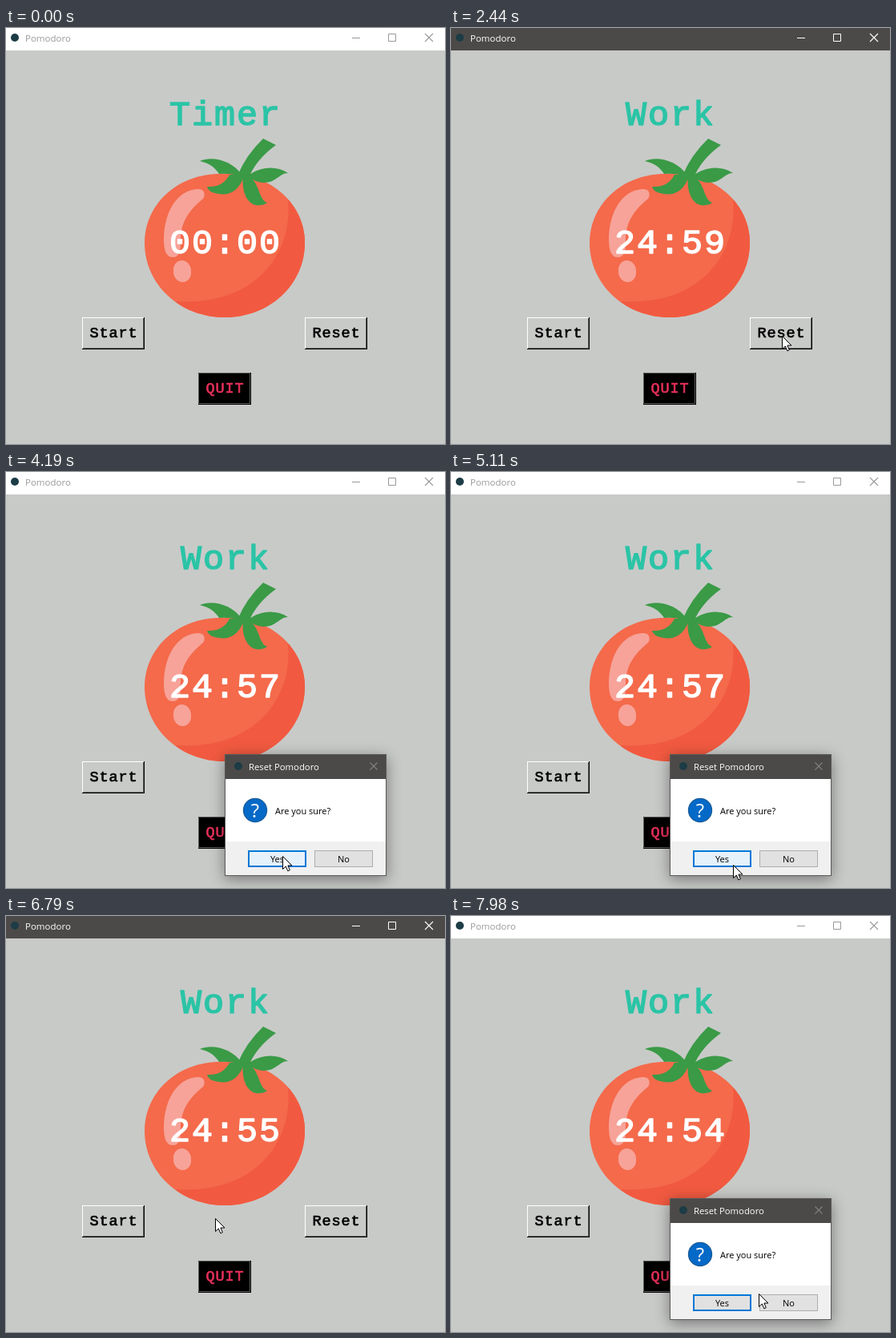
An HTML page with a canvas that plays this animation: 548x519 px, repeating every 8 s.

```html
<!DOCTYPE html>
<html lang="en">
<head>
<meta charset="utf-8">
<title>Pomodoro</title>
<style>
html, body { margin: 0; width: 100%; height: 100%; overflow: hidden; background: #c8cac8; }
canvas { display: block; }
</style>
</head>
<body>
<canvas id="stage" width="548" height="519"></canvas>
<script>
const W = 548, H = 519, LOOP = 8000;
const MONO = '"Liberation Mono", "Courier New", monospace';
const SANS = '"Open Sans", "Noto Sans", sans-serif';
const BG = '#c8cac8', BAR = '#4c4a48', BLUE = '#0078d7';

const screen = document.getElementById('stage').getContext('2d');
const layer = document.createElement('canvas');
layer.width = W;
layer.height = H;
const layerCtx = layer.getContext('2d');
let ctx = screen;

const START_DOWN = 930, START_UP = 1060, TICK = 1020;
const RESET_DOWN = [2740, 7450];
const OPEN = [2855, 7600];
const CLOSE = [5600, Infinity];
const NO_DOWN = 5500;

// Pointer path: time, x, y
const path = [
  [90, 322, 484], [400, 190, 415], [650, 119, 372], [850, 138, 383],
  [1380, 138, 384], [1480, 279, 307], [1640, 385, 345], [1850, 417, 388],
  [2170, 412, 383], [2830, 414, 385], [3010, 414, 385], [3300, 395, 440],
  [3600, 340, 470], [3820, 330, 478], [4190, 345, 479], [4500, 415, 485],
  [4700, 420, 488], [4950, 345, 488], [5200, 360, 491], [5440, 416, 484],
  [5700, 416, 484], [6000, 290, 440], [6290, 190, 401], [6450, 135, 390],
  [6600, 165, 380], [6790, 260, 377], [7080, 424, 380], [7170, 420, 379],
  [7480, 414, 385], [7700, 414, 385], [7980, 384, 471]
];

const clamp = v => Math.max(0, Math.min(1, v));

// Slope at a key; zero where the axis turns or rests
function slope(i, axis) {
  const a = path[i - 1], b = path[i], c = path[i + 1];
  if (!a || !c) return 0;
  const s = (b[axis] - a[axis]) / (b[0] - a[0]);
  const r = (c[axis] - b[axis]) / (c[0] - b[0]);
  return s * r <= 0 ? 0 : 2 * s * r / (s + r);
}

function pointer(t) {
  const last = path[path.length - 1];
  if (t >= last[0]) return [last[1], last[2]];
  const i = Math.max(0, path.findIndex(k => k[0] > t) - 1);
  const a = path[i], b = path[i + 1];
  const d = b[0] - a[0], u = clamp((t - a[0]) / d);
  return [1, 2].map(n => {
    const h = u * u * (3 - 2 * u);
    return a[n] + (b[n] - a[n]) * h
      + d * u * (1 - u) * ((1 - u) * slope(i, n) - u * slope(i + 1, n));
  });
}

function rect(x, y, w, h, color) {
  ctx.fillStyle = color;
  ctx.fillRect(x, y, w, h);
}

function frame(x, y, w, h, color, line = 1) {
  ctx.strokeStyle = color;
  ctx.lineWidth = line;
  ctx.strokeRect(x + line / 2, y + line / 2, w - line, h - line);
}

function text(str, x, y, font, color, align = 'left') {
  ctx.font = font;
  ctx.fillStyle = color;
  ctx.textAlign = align;
  ctx.fillText(str, x, y);
}

// Typewriter lettering: one glyph per cell, slightly thickened
function typed(str, cx, y, pitch, color) {
  const size = pitch * 1.55;
  ctx.strokeStyle = color;
  ctx.lineWidth = size * 0.035;
  ctx.lineJoin = 'round';
  [...str].forEach((ch, i) => {
    const x = cx + (i - (str.length - 1) / 2) * pitch;
    text(ch, x, y, size + 'px ' + MONO, color, 'center');
    ctx.strokeText(ch, x, y);
  });
}

function dot(x, y, r, color) {
  ctx.fillStyle = color;
  ctx.beginPath();
  ctx.arc(x, y, r, 0, 7);
  ctx.fill();
}

function cross(x, y, size, color) {
  ctx.strokeStyle = color;
  ctx.lineWidth = 1.1;
  ctx.beginPath();
  ctx.moveTo(x, y);
  ctx.lineTo(x + size, y + size);
  ctx.moveTo(x + size, y);
  ctx.lineTo(x, y + size);
  ctx.stroke();
}

const body = new Path2D('M273 361C217 361 173 320 173 268C173 220 214 182 267 182' +
  'H279C331 182 373 220 373 268C373 320 329 361 273 361Z');
const shade = new Path2D('M352 215C358 281 312 347 212 341L230 375H390V215Z');
const shine = new Path2D('M238 201C247 200 250 207 246 213C230 226 219 240 218 262' +
  'C218 275 218 286 208 286C199 286 197 275 197 262C198 228 214 203 238 201Z' +
  'M231 303.500A11 12.500 -10 1 1 209 303.500A11 12.500 -10 1 1 231 303.500Z');
const leaves = [
  'M321 138L337 146Q312 164 303 187L289 184Q300 158 321 138Z',
  'M242 166C258 159 283 166 294 183L290 184Q279 181 266 182C260 173 254 169 242 166Z',
  'M251 198C265 199 274 193 279 183L298 183C293 198 284 207 272 207.500C261 207 253 205 251 198Z',
  'M296 184C294 201 299 218 312 221Q320 222 326 218C315 214 318 196 303 184Z',
  'M301 185C317 173 336 171 352 181C341 181 338 193 321 193Q311 192 301 185Z'
].map(d => new Path2D(d));

function tomato() {
  ctx.fillStyle = '#f46a4b';
  ctx.fill(body);
  ctx.save();
  ctx.clip(body);
  ctx.fillStyle = '#f15a40';
  ctx.fill(shade);
  ctx.restore();
  ctx.fillStyle = '#f7a399';
  ctx.fill(shine);
  ctx.fillStyle = '#3a9a46';
  leaves.forEach(p => ctx.fill(p));
}

function titleBar(active) {
  const ink = active ? '#fff' : '#999';
  rect(0, 0, W, 28, active ? BAR : '#fff');
  dot(11, 12, 5, '#1c3c46');
  text('Pomodoro', 24, 17, '11.5px ' + SANS, ink);
  rect(432, 12, 10, 1, ink);
  frame(477, 7, 10, 10, ink);
  cross(523, 7, 10, ink);
}

function button(label, x, y, w, down) {
  const h = 40, o = down ? 1 : 0;
  rect(x, y, w, h, down ? '#fff' : '#000');
  rect(x, y, w - 1, h - 1, down ? '#000' : '#fff');
  rect(x + 1, y + 1, w - 2, h - 2, down ? BG : '#5c5d5c');
  rect(x + 1 + o, y + 1 + o, w - 3 - o, h - 3 - o, BG);
  typed(label, x + w / 2 + o, y + 25 + o, 12, '#000');
}

function quitButton() {
  rect(240, 430, 66, 40, '#000');
  frame(240, 430, 65, 39, '#5c5d5c');
  typed('QUIT', 273, 455, 12, '#e7305b');
}

function choice(label, x, w, { hover, focus, down }) {
  rect(x, 472, w, 21, down ? '#cce4f7' : hover ? '#e5f1fb' : '#e1e1e1');
  const edge = down ? '#005499' : hover || focus ? BLUE : '#adadad';
  frame(x, 472, w, 21, edge, focus && !down ? 2 : 1);
  text(label, x + w / 2, 487, '11px ' + SANS, '#000', 'center');
}

function dialog(t, [mx, my]) {
  const over = (x, w) => t > 3010 && mx >= x && mx < x + w && my >= 472 && my < 493;
  const onNo = t > NO_DOWN && t < OPEN[1];
  ctx.save();
  ctx.shadowColor = 'rgba(0,0,0,.42)';
  ctx.shadowBlur = 17;
  ctx.shadowOffsetY = 4;
  rect(273, 352, 202, 152, '#5a5958');
  ctx.restore();
  rect(274, 383, 200, 78, '#fff');
  rect(274, 461, 200, 42, '#f0f0f0');
  rect(274, 353, 200, 30, BAR);
  dot(290, 367, 5, '#1c3c46');
  text('Reset Pomodoro', 303, 372, '11.3px ' + SANS, '#fff');
  cross(454.5, 362.5, 9, '#828180');
  dot(311, 422, 15.2, '#1b5c96');
  dot(311, 422, 14, '#0569c8');
  text('?', 311, 431, '24px ' + SANS, '#fff', 'center');
  text('Are you sure?', 336, 427, '11px ' + SANS, '#000');
  choice('Yes', 302, 73, { hover: over(302, 73), focus: !onNo });
  choice('No', 385, 73, { hover: over(385, 73), focus: onNo, down: onNo });
}

function showDialog(t, pos) {
  const n = t < OPEN[1] ? 0 : 1;
  if (t < OPEN[n]) return;
  const out = clamp((t - CLOSE[n]) / 135);
  if (out === 1) return;
  const shown = 1 - (1 - clamp((t - OPEN[n]) / 250)) ** 3;
  const scale = 0.9 + 0.1 * shown - 0.05 * out;

  ctx = layerCtx;
  ctx.clearRect(0, 0, W, H);
  dialog(t, pos);
  ctx = screen;

  ctx.save();
  ctx.globalAlpha = shown * (1 - out);
  ctx.translate(374, 428);
  ctx.scale(scale, scale);
  ctx.drawImage(layer, -374, -428);
  ctx.restore();
}

const arrow = new Path2D('M.5 .5V16.500L4.300 13L6.800 18.800L9.300 17.700L6.900 12H12Z');

function drawPointer([x, y]) {
  ctx.save();
  ctx.translate(Math.round(x), Math.round(y));
  ctx.fillStyle = '#fff';
  ctx.strokeStyle = '#000';
  ctx.lineWidth = 1;
  ctx.fill(arrow);
  ctx.stroke(arrow);
  ctx.restore();
}

function clock(t) {
  if (t < START_UP) return '00:00';
  const left = 1500 - Math.floor((t - START_UP) / TICK);
  return [Math.floor(left / 60), left % 60].map(v => String(v).padStart(2, '0')).join(':');
}

function draw(t) {
  const pos = pointer(t);
  const active = t >= START_DOWN && t < OPEN[0] || t >= CLOSE[0] && t < OPEN[1];
  const resetDown = t >= RESET_DOWN[0] && t < CLOSE[0] || t >= RESET_DOWN[1];

  rect(0, 0, W, H, BG);
  titleBar(active);
  typed(t < START_UP ? 'Timer' : 'Work', 273, 121, 28, '#2bc4a6');
  tomato();
  typed(clock(t), 273, 281, 28, '#fff');
  button('Start', 95, 361, 78, t >= START_DOWN && t < START_UP);
  button('Reset', 373, 361, 78, resetDown);
  quitButton();
  showDialog(t, pos);
  if (t >= 90 && !(t >= OPEN[0] && t < 3010)) drawPointer(pos);
}

const begin = performance.now();
function tick() {
  draw((performance.now() - begin) % LOOP);
  requestAnimationFrame(tick);
}
tick();
</script>
</body>
</html>
```
